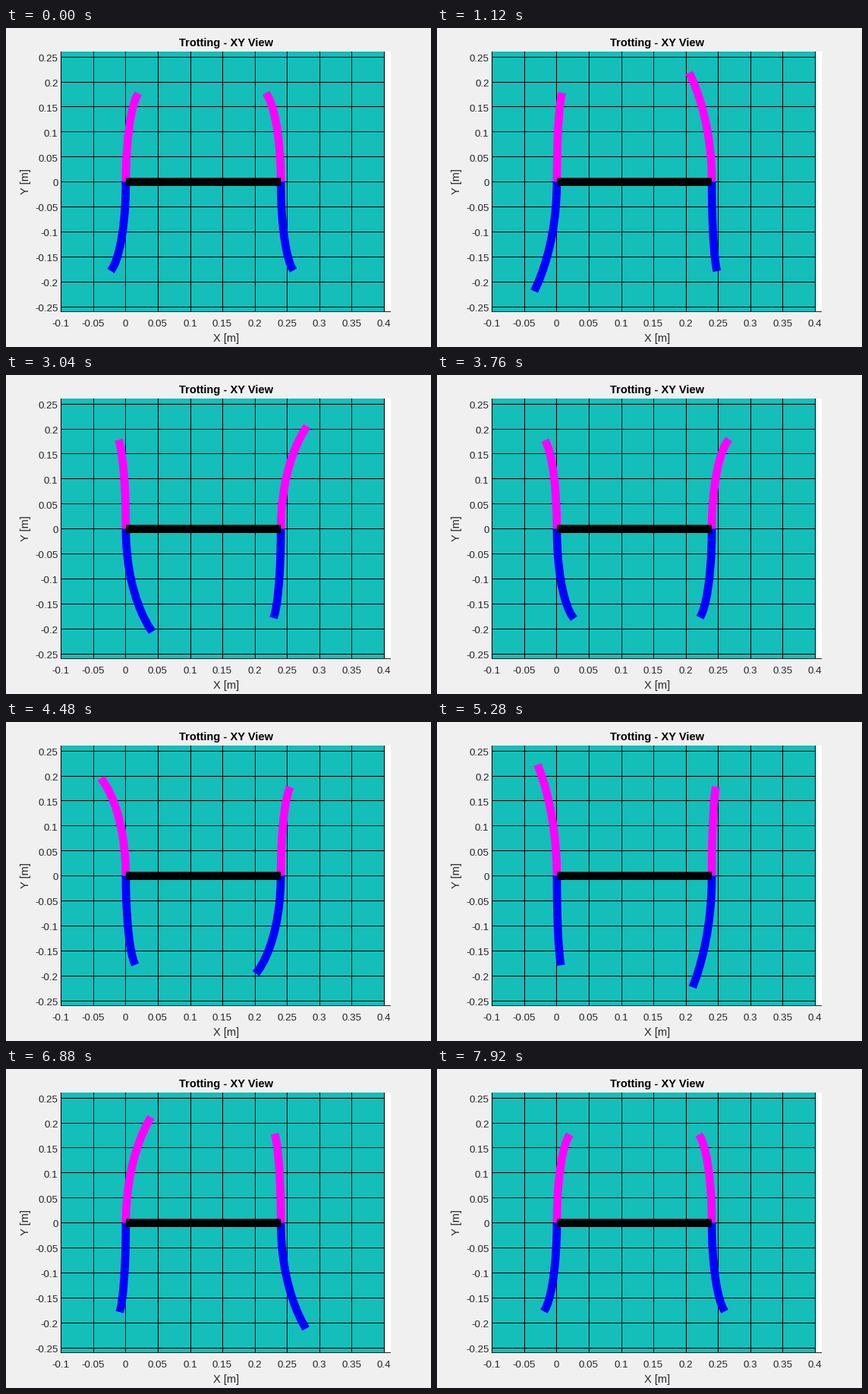
Animation of 560 by 420 pixels, one loop 8 s. Source, as a matplotlib script:

```python
import numpy as np
import matplotlib.pyplot as plt
from matplotlib.animation import FuncAnimation
from matplotlib.patches import Rectangle

W, H, DPI = 560, 420, 100
FRAMES, INTERVAL = 100, 80
HALF = FRAMES // 2

# Plot box and scale, in pixels
LEFT, RIGHT, TOP, BOTTOM = 73, 507, 31, 374
X0, Y0 = 157.9, 202.65
SX, SY = 851.0, 658.2

# Robot, in metres
BODY = 0.24
LEG = 0.24
STRIDE = 0.02
DEPTH = 0.1345
LIFT = 0.0755
SEGMENTS = 10

INK = "#262626"
TEAL = "#14beb9"
MAGENTA = "#ff00ff"
BLUE = "#0000ff"


def px(x):
    return X0 + SX * x


def py(y):
    return Y0 - SY * y


def pt(pixels):
    return pixels * 72 / DPI


# Bend angle as a function of sideways reach divided by leg length
BENDS = np.linspace(1e-4, 2.0, 2000)
REACH = (1 - np.cos(BENDS)) / BENDS


def foot(step):
    """Fore-aft offset and depth of a foot: swing first, then stance."""
    step %= FRAMES
    s = (step % HALF + 1) / HALF
    if step >= HALF:
        return STRIDE * (1 - 2 * s), DEPTH
    x = (STRIDE * (2 * s - 1) - 0.0294 * np.sin(2 * np.pi * s)
         - 0.0016 * np.sin(4 * np.pi * s))
    return x, DEPTH - LIFT * abs(np.sin(np.pi * s ** 0.97)) ** 1.5


def leg_curve(base, side, step):
    """Constant-curvature leg of fixed length, seen from above."""
    x, z = foot(step)
    reach = np.hypot(x, z)
    bend = np.interp(reach / LEG, REACH, BENDS)
    a = np.linspace(0, bend, SEGMENTS + 1)
    radius = LEG / bend
    xs = base + radius * (1 - np.cos(a)) * x / reach
    ys = side * radius * np.sin(a)
    return px(xs), py(ys)


fig = plt.figure(figsize=(W / DPI, H / DPI), dpi=DPI, facecolor="#f0f0f0")
ax = fig.add_axes([0, 0, 1, 1])
ax.set_xlim(0, W)
ax.set_ylim(H, 0)
ax.axis("off")


def label(x, y, text, size, **kw):
    style = dict(family="Liberation Sans", fontsize=pt(size), color=INK,
                 ha="center", va="baseline")
    style.update(kw)
    ax.text(x, y, text, **style)


def rule(xs, ys, color="black"):
    # Placed on pixel centres already, so snapping would move it
    ax.plot(xs, ys, color=color, lw=pt(1), solid_capstyle="butt",
            antialiased=False, snap=False, zorder=2)


def thick(color, zorder):
    return ax.plot([], [], color=color, lw=pt(10.67), zorder=zorder,
                   solid_capstyle="butt", solid_joinstyle="round",
                   snap=False)[0]


# Ground and grid
edge = int(px(0.4))
ax.add_patch(Rectangle((LEFT, TOP), RIGHT - LEFT, BOTTOM - TOP,
                       fc="white", ec="none", zorder=0))
ax.add_patch(Rectangle((LEFT, TOP), edge - LEFT, BOTTOM - TOP,
                       fc=TEAL, ec="none", zorder=1))

for i in range(-2, 9):
    v = i * 0.05
    x = int(px(v)) + 0.5
    rule([x, x], [TOP, BOTTOM])
    label(px(v) - 0.6, 393, f"{v:.2g}", 13.33)

for i in range(-5, 6):
    v = i * 0.05
    y = int(py(v)) + 0.5
    rule([LEFT, edge], [y, y])
    label(68.6, py(v) + 5.8, f"{v:.2g}", 13.33, ha="right")

rule([LEFT, RIGHT], [BOTTOM - 0.5] * 2, INK)

label(290, 24, "Trotting - XY View", 14.67, weight="bold", color="black")
label(290.5, 413, "X [m]", 14.67)
label(30, 202, "Y [m]", 14.67, rotation=90, rotation_mode="anchor")

# Each leg: base, side, colour, offset in the gait cycle
LEGS = [
    (0, 1, MAGENTA, HALF),
    (0, -1, BLUE, 0),
    (BODY, 1, MAGENTA, 0),
    (BODY, -1, BLUE, HALF),
]
lines = [thick(color, 4) for _, _, color, _ in LEGS]
body = thick("black", 5)
body.set_data([px(0), px(BODY)], [py(0)] * 2)


def draw(i):
    for line, (base, side, _, offset) in zip(lines, LEGS):
        line.set_data(*leg_curve(base, side, i + offset))
    return lines


anim = FuncAnimation(fig, draw, frames=FRAMES, interval=INTERVAL,
                     repeat=True, repeat_delay=0)
plt.show()
```
